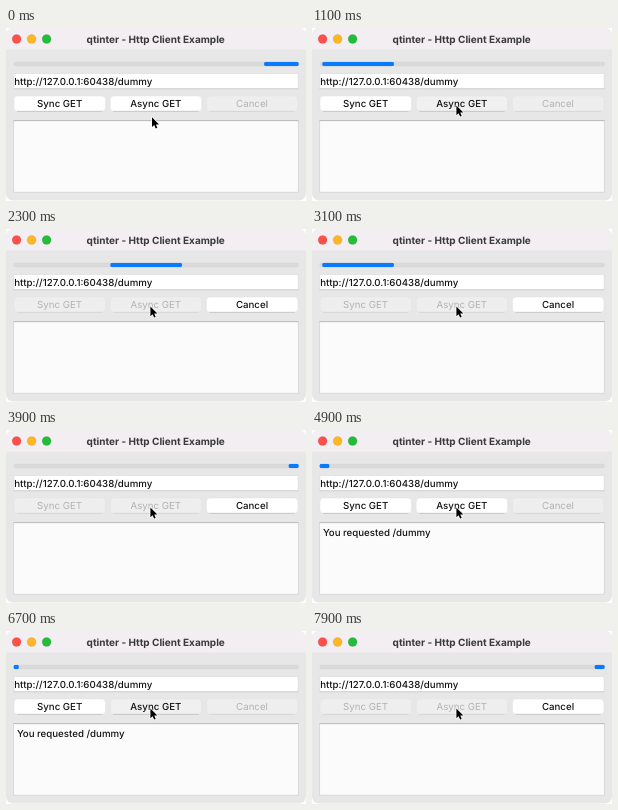
Recreate the animation shown at these times as an HTML page. Size 300 px wide and 173 px high, loop 8000 ms.

```html
<!DOCTYPE html>
<html lang="en">
<head>
<meta charset="utf-8">
<title>Http Client Example</title>
<style>
  html, body { margin: 0; width: 100%; height: 100%; overflow: hidden; background: #fff; }
  svg { display: block; width: 300px; height: 173px; }
  text { font: 500 9.7px Inter, Roboto, sans-serif; fill: #111; white-space: pre; text-rendering: geometricPrecision; }
  .title { font-size: 10px; font-weight: 700; fill: #3a3a3a; }
  .mid { text-anchor: middle; }
  .face { fill: #fff; stroke: #dcdcdc; stroke-width: .4; }
  .edge { stroke: #c2c2c2; stroke-width: .8; }
  .off .face { fill: #efeeef; stroke: #dedede; }
  .off .edge { stroke: #d4d4d4; }
  .off text { fill: #b2b2b2; font-weight: 400; }
  .down .face { fill: #f0f0f0; }
</style>
</head>
<body>
<svg viewBox="0 0 300 173">
  <defs>
    <clipPath id="groove"><rect x="7.5" y="33.8" width="285.3" height="4.4" rx="2.2"/></clipPath>
    <clipPath id="frame"><rect width="300" height="172.6" rx="7"/></clipPath>
  </defs>
  <g clip-path="url(#frame)">
    <rect width="300" height="173" fill="#e8e7e8"/>
    <rect width="300" height="21.5" fill="#f2eef2"/>
  </g>
  <g id="lights"></g>
  <text class="title mid" x="149.7" y="14.6">qtinter - Http Client Example</text>

  <rect x="7.7" y="34" width="284.9" height="4" rx="2" fill="#dadada" stroke="#d2d2d2" stroke-width=".4"/>
  <g clip-path="url(#groove)">
    <rect id="bar" y="33.8" width="72" height="4.4" rx="2.2" fill="#0a7bff"/>
  </g>

  <rect x="7.9" y="45.4" width="284.2" height="15.4" fill="#fff" stroke="#d9d9d9" stroke-width=".6"/>
  <path d="M7.5 60.8H292.5" stroke="#c8c8c8" stroke-width=".7"/>
  <text x="8.2" y="56.8">http://127.0.0.1:60438/dummy</text>

  <g id="buttons"></g>

  <rect x="7.7" y="92.7" width="284.6" height="71.5" fill="#fbfbfb" stroke="#d0d0d0" stroke-width=".7"/>
  <path d="M7.4 92.6H292.6" stroke="#b4b4b4" stroke-width=".8"/>
  <text id="reply" x="10.9" y="106">You requested /dummy</text>

  <path id="cursor" d="M0 0V9.8L2.2 7.8L3.7 11.2L5.3 10.5L3.9 7.2H7Z"
        fill="#000" stroke="#fff" stroke-width="1.4" stroke-linejoin="round" paint-order="stroke"/>
</svg>
<script>
const LOOP = 8000, STEP = 100;
const SWEEP = 1000, TURN = 784;      // one pass of the bar, and when it is at the left end
const LEFT = -64, RIGHT = 292;
const REPLY_DELAY = 3000;
const clicks = [1100, 6700];         // mouse down times
const HOLD = 100;

const $ = id => document.getElementById(id);
const clamp = v => Math.max(0, Math.min(1, v));
const smooth = v => v * v * (3 - 2 * v);

function make(parent, tag, attrs, text) {
  const el = document.createElementNS("http://www.w3.org/2000/svg", tag);
  for (const k in attrs) el.setAttribute(k, attrs[k]);
  if (text) el.textContent = text;
  return parent.appendChild(el);
}

["#fe4f49", "#fdb724", "#22bd3a"].forEach((fill, i) =>
  make($("lights"), "circle", { cx: 10.6 + 15 * i, cy: 11, r: 4.5, fill, stroke: "#0002", "stroke-width": .5 }));

const [sync, async_, cancel] = ["Sync GET", "Async GET", "Cancel"].map((label, i) => {
  const x = 8 + 96.2 * i, g = make($("buttons"), "g", {});
  make(g, "rect", { class: "face", x, y: 68, width: 91.5, height: 15.2, rx: 3.8 });
  make(g, "path", { class: "edge", d: `M${x + 3} 83.4h85.5` });
  make(g, "text", { class: "mid", x: x + 45.6, y: 79 }, label);
  return g;
});

// cubic-bezier(.42, 0, .58, 1)
function easeInOut(x) {
  let lo = 0, hi = 1;
  for (let i = 0; i < 24; i++) {
    const s = (lo + hi) / 2, r = 1 - s;
    if (1.26 * s * r * r + 1.74 * s * s * r + s * s * s < x) lo = s; else hi = s;
  }
  return smooth(lo);
}

function barLeft(t) {
  const p = ((t - TURN + 2 * LOOP) % (2 * SWEEP)) / SWEEP;
  return LEFT + (RIGHT - LEFT) * easeInOut(p < 1 ? p : 2 - p);
}

function draw(t) {
  const within = (from, span) => t >= from && t < from + span;
  const pressed = clicks.some(c => within(c, HOLD));
  const busy = clicks.some(c => within(c + HOLD, REPLY_DELAY));
  const replied = t >= clicks[0] + HOLD + REPLY_DELAY && t < clicks[1] + HOLD;

  $("bar").setAttribute("x", barLeft(t).toFixed(2));
  sync.setAttribute("class", busy ? "off" : "");
  async_.setAttribute("class", busy ? "off" : pressed ? "down" : "");
  cancel.setAttribute("class", busy ? "" : "off");
  $("reply").setAttribute("visibility", replied ? "visible" : "hidden");

  const k = smooth(clamp((t - 200) / 500));
  $("cursor").setAttribute("transform", `translate(${146 - 1.6 * k} ${89.2 - 11.8 * k})`);
}

const start = performance.now();
function tick() {
  const t = (performance.now() - start) % LOOP;
  draw(Math.floor(t / STEP) * STEP);
  requestAnimationFrame(tick);
}
draw(0);
requestAnimationFrame(tick);
</script>
</body>
</html>
```
